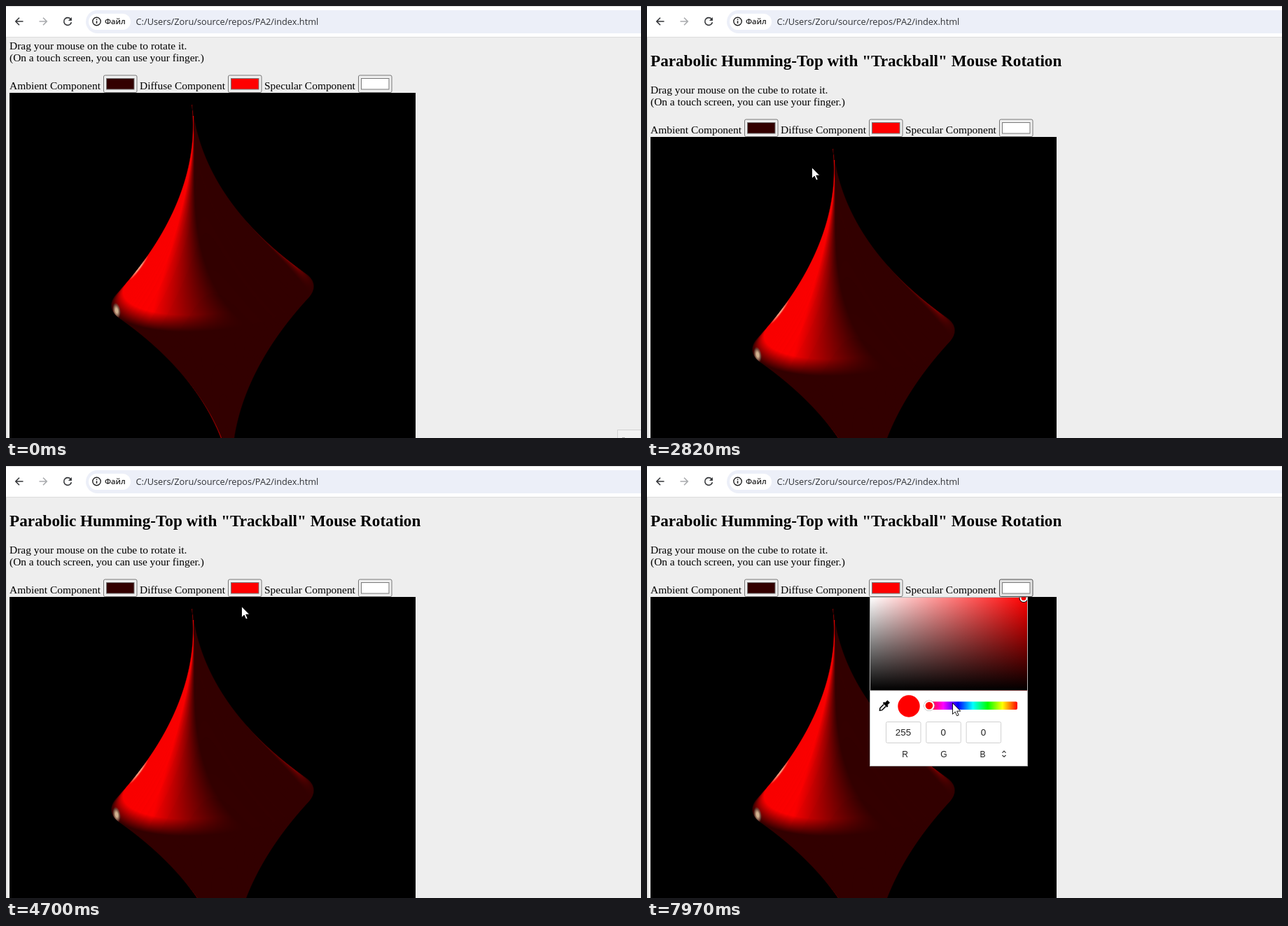
These frames come from a looping animation (907x617 px, 8 s). An HTML page with a canvas:

```html
<!DOCTYPE html>
<html lang="en">
<head>
<meta charset="utf-8">
<title>Parabolic Humming-Top</title>
<style>
html, body { margin: 0; width: 100%; height: 100%; overflow: hidden; background: #eee; }
#stage { position: absolute; left: 0; top: 0; width: 907px; height: 617px; overflow: hidden; }
#page { position: absolute; left: 0; top: 0; width: 907px; height: 800px; }
#page canvas { position: absolute; left: 5px; top: 187px; }
svg { position: absolute; left: 0; top: 0; }
.serif { font: 15.45px "Liberation Serif", "Times New Roman", serif; }
.head { font-size: 23.17px; font-weight: bold; }
.ui { font-family: "Open Sans", "Noto Sans", sans-serif; }
.pick { font: 13.4px "Liberation Sans", Arial, sans-serif; text-anchor: middle; fill: #222; }
.button { fill: #efefef; stroke: #767676; }
.button.hover { fill: #e2e2e2; stroke: #4f4f4f; }
</style>
</head>
<body>
<div id="stage">
  <div id="page">
    <canvas id="top" width="580" height="580"></canvas>
    <svg id="controls" width="907" height="187" class="serif">
      <text class="head" x="5" y="86">Parabolic Humming-Top with "Trackball" Mouse Rotation</text>
      <text x="5" y="125">Drag your mouse on the cube to rotate it.</text>
      <text x="5" y="142.3">(On a touch screen, you can use your finger.)</text>
      <text x="5" y="182">Ambient Component</text>
      <text x="191" y="182">Diffuse Component</text>
      <text x="369" y="182">Specular Component</text>
    </svg>
  </div>
  <svg width="907" height="617">
    <defs>
      <linearGradient id="sat"><stop stop-color="#fff"/><stop offset="1" stop-color="#f00"/></linearGradient>
      <linearGradient id="val" x2="0" y2="1"><stop stop-opacity="0"/><stop offset="1"/></linearGradient>
      <linearGradient id="hue">
        <stop stop-color="#f00"/><stop offset=".167" stop-color="#f0f"/><stop offset=".333" stop-color="#00f"/>
        <stop offset=".5" stop-color="#0ff"/><stop offset=".667" stop-color="#0f0"/>
        <stop offset=".833" stop-color="#ff0"/><stop offset="1" stop-color="#f00"/>
      </linearGradient>
      <clipPath id="field"><path d="M318 187.500H543V321H318Z"/></clipPath>
    </defs>

    <path d="M.5 45V617" stroke="#dcdcdc"/>
    <g id="corner">
      <rect x="873.500" y="605.500" width="50" height="30" fill="#f2f2f2" stroke="#d2d2d2"/>
      <path d="M880 616.500h4" stroke="#b0b0b0"/>
    </g>

    <g class="ui">
      <rect width="907" height="45" fill="#fff"/>
      <path d="M0 .5H907M0 44.500H907" stroke="#dcdcdc"/>
      <rect x="114" y="6" width="830" height="33" rx="16.500" fill="#eceff8"/>
      <rect x="118" y="11" width="60" height="23" rx="11.500" fill="#fff"/>
      <g fill="none" stroke-width="1.600">
        <path d="M24.500 22H14M19 16.800L13.800 22L19 27.200" stroke="#35373a"/>
        <path d="M47.500 22H58M53 16.800L58.200 22L53 27.200" stroke="#a9abae"/>
        <path d="M92.500 18.800A5.400 5.400 0 1 0 93.400 23.200" stroke="#35373a"/>
        <circle cx="129.500" cy="22" r="5.700" stroke="#222" stroke-width="1.400"/>
        <path d="M129.500 21.300V25M129.500 18.600V20" stroke="#222"/>
      </g>
      <path d="M93.900 16V21H88.900Z" fill="#35373a"/>
      <text x="141" y="26" font-size="11" font-weight="600" fill="#222">Файл</text>
      <text x="185.500" y="26.700" font-size="12.780" fill="#303236">C:/Users/Zoru/source/repos/PA2/index.html</text>
    </g>

    <g id="picker">
      <rect x="318.500" y="187.500" width="225" height="241" fill="#fff" stroke="#b5b5b5"/>
      <g clip-path="url(#field)">
        <rect x="319" y="188" width="224" height="132.500" fill="url(#sat)"/>
        <rect x="319" y="188" width="224" height="132.500" fill="url(#val)"/>
        <circle cx="538" cy="188.500" r="6.500"/>
        <circle cx="538" cy="188.500" r="4.500" fill="#f00" stroke="#fff" stroke-width="2"/>
      </g>
      <g transform="translate(338.500 343) rotate(45)">
        <path d="M-2.500 -9.500h5v5h1.700v2.600h-8.400v-2.600h1.700z"/>
        <path d="M-2 -1.500V6L0 8.600L2 6V-1.500" fill="none" stroke="#000" stroke-width="1.500"/>
      </g>
      <circle cx="374" cy="343" r="15.700" fill="#f00"/>
      <rect x="402" y="336.500" width="127" height="11.500" rx="2" fill="url(#hue)"/>
      <circle cx="403" cy="342.300" r="7.800" fill="#aaa"/>
      <circle cx="403" cy="342.300" r="6.300" fill="#f00" stroke="#fff" stroke-width="2"/>
      <g id="fields" class="pick"></g>
      <path d="M507.500 409.700L510 407.200L512.500 409.700M507.500 413L510 415.500L512.500 413" fill="none" stroke="#333" stroke-width="1.200"/>
    </g>

    <path id="cursor" d="M0 0V16L3.700 12.500L6.200 18.300L8.700 17.300L6.200 11.600H11.300Z" fill="#fff" stroke="#000" stroke-width=".9"/>
  </svg>
</div>
<script>
const LOOP = 8000;
const $ = id => document.getElementById(id);
const clamp = v => Math.max(0, Math.min(1, v));

function add(parent, tag, attrs, text) {
  const el = document.createElementNS("http://www.w3.org/2000/svg", tag);
  for (const name in attrs) el.setAttribute(name, attrs[name]);
  if (text) el.textContent = text;
  return parent.appendChild(el);
}

const buttons = [[139.5, "#300"], [317.5, "#f00"], [503.5, "#fff"]].map(([x, fill]) => {
  const box = add($("controls"), "rect", { class: "button", x, y: 162, width: 47.5, height: 24.5, rx: 2 });
  add($("controls"), "rect", { x: x + 4, y: 166.5, width: 39.5, height: 15.5, fill, stroke: "#777" });
  return box;
});

["R", "G", "B"].forEach((name, i) => {
  const x = 366 + i * 57.3;
  add($("fields"), "rect", { x: x - 24.5, y: 365.5, width: 49.5, height: 30, rx: 2, fill: "#fff", stroke: "#d0d0d0" });
  add($("fields"), "text", { x, y: 385 }, i ? "0" : "255");
  add($("fields"), "text", { x: 368.5 + i * 55.5, y: 416, "font-size": 12 }, name);
});

// Surface of revolution: radius = WIDE * (1 - |v| / TALL)^2 along its axis v
const WIDE = 145, CENTER = [290, 290];
const LEAN = Math.atan2(29, 271), TILT = Math.asin(0.34);
const TALL = 272.5 / Math.cos(TILT);
const LIGHT = [-0.54, 0.66, -0.52], GAIN = 2.2, CREASE = 0.065;
const [cosL, sinL, cosT, sinT] = [Math.cos(LEAN), Math.sin(LEAN), Math.cos(TILT), Math.sin(TILT)];
const taper = v => Math.max(0, 1 - Math.abs(v) / TALL);

// Nearest point of the surface along the view ray through (u, p)
function trace(u, p) {
  let best = { gap: Infinity };
  for (let depth = 200, i = 0; i < 80 && depth > -200; i++) {
    const v = p * cosT + depth * sinT, w = depth * cosT - p * sinT;
    const gap = 0.7 * (Math.hypot(u, w) - WIDE * taper(v) ** 2 + 0.4);
    if (gap < best.gap) best = { gap, v, w };
    if (gap < 0.03) break;
    depth -= gap;
  }
  return best;
}

function diffuse(u, v, w) {
  const radius = Math.hypot(u, w) || 1, s = v / TALL;
  const slope = Math.sign(v) * 2 * WIDE / TALL * taper(v);
  const dot = (LIGHT[0] * u + LIGHT[2] * w) / radius + LIGHT[1] * slope;
  const fade = s > 0 ? clamp(s / CREASE) : 1;
  return clamp(GAIN * dot / Math.hypot(1, slope)) * fade;
}

const glint = (dx, dy, long, wide, angle) => {
  const c = Math.cos(angle), s = Math.sin(angle);
  return clamp(1.4 - Math.hypot((dx * c + dy * s) / long, (dy * c - dx * s) / wide));
};

function drawTop() {
  const { width, height } = $("top"), ctx = $("top").getContext("2d");
  const img = ctx.createImageData(width, height);
  for (let k = 0; k < width * height; k++) {
    img.data[k * 4 + 3] = 255;
    const dx = k % width + 0.5 - CENTER[0], dy = Math.floor(k / width) + 0.5 - CENTER[1];
    const u = dx * cosL - dy * sinL, p = -dx * sinL - dy * cosL;
    if (Math.abs(u) > WIDE + 1 || Math.abs(p) > 275) continue;
    const hit = trace(u, p), cover = clamp(1 - hit.gap);
    if (!cover) continue;
    const shine = Math.max(0.8 * glint(dx + 137, dy - 21, 8, 4, 1.4), 0.7 * glint(dx + 105, dy + 40, 16, 2, -0.93));
    const red = 51 + 204 * Math.max(diffuse(u, hit.v, hit.w), shine);
    [red, 228 * shine, 185 * shine].forEach((c, i) => { img.data[k * 4 + i] = cover * c; });
  }
  ctx.putImageData(img, 0, 0);
}

// Pointer moves: start, end, then evenly timed waypoints
const STEP = 69;
const moves = [
  [670, 740, [839, 596], [817, 583]],
  [1010, 1340, [814, 578], [837, 554]],
  [1860, 2620, [858, 540], [760, 480], [510, 340], [323, 240], [304, 247]],
  [2680, 2820, [290, 244], [235, 231]],
  [3610, 4360, [235, 231], [235, 231]],
  [4420, 5100, [222, 236], [197, 241], [336, 201], [362, 182], [366, 178], [352, 176]],
  [5240, 6030, [340, 180], [262, 330], [330, 413], [450, 349]],
  [6110, 6910, [441, 349], [468, 315], [490, 240]],
  [6970, 7710, [495, 225], [520, 176], [438, 313]],
  [7780, 7970, [438, 320], [436, 339]],
];

// Time held at the latest screen update, and the pointer there
function sample(t) {
  const [start, end, ...points] = moves.filter(m => m[0] <= t).pop() || moves[0];
  if (t < start) return { time: 0, x: 0, y: 0 };
  const steps = Math.round((end - start) / STEP);
  const u = Math.min(steps, Math.floor((t - start) / (end - start) * steps + 0.35)) / steps;
  const pos = u * (points.length - 1), i = Math.min(points.length - 2, Math.floor(pos));
  const [x, y] = points[i].map((c, j) => Math.round(c + (points[i + 1][j] - c) * (pos - i)));
  return { time: start + u * (end - start), x, y };
}

function scrollAt(t) {
  if (t < 2700) return 63 * clamp((2620 - t) / 138) ** 2;
  return 92 * Math.sin(Math.PI * clamp((t - 3600) / 760));
}

const show = (el, on) => { el.style.display = on ? "" : "none"; };

function render(t) {
  const { time, x, y } = sample(t);
  $("page").style.transform = `translateY(${-Math.round(scrollAt(time))}px)`;
  $("cursor").setAttribute("transform", `translate(${x + 0.5} ${y - 0.5})`);
  show($("cursor"), t >= 670);
  show($("corner"), t < 70);
  show($("picker"), t >= 5240);
  buttons[1].classList.toggle("hover", t >= 4880 && t < 5300);
  buttons[2].classList.toggle("hover", t >= 7160);
}

drawTop();
const began = performance.now();
function frame() {
  render((performance.now() - began) % LOOP);
  requestAnimationFrame(frame);
}
frame();
</script>
</body>
</html>
```
